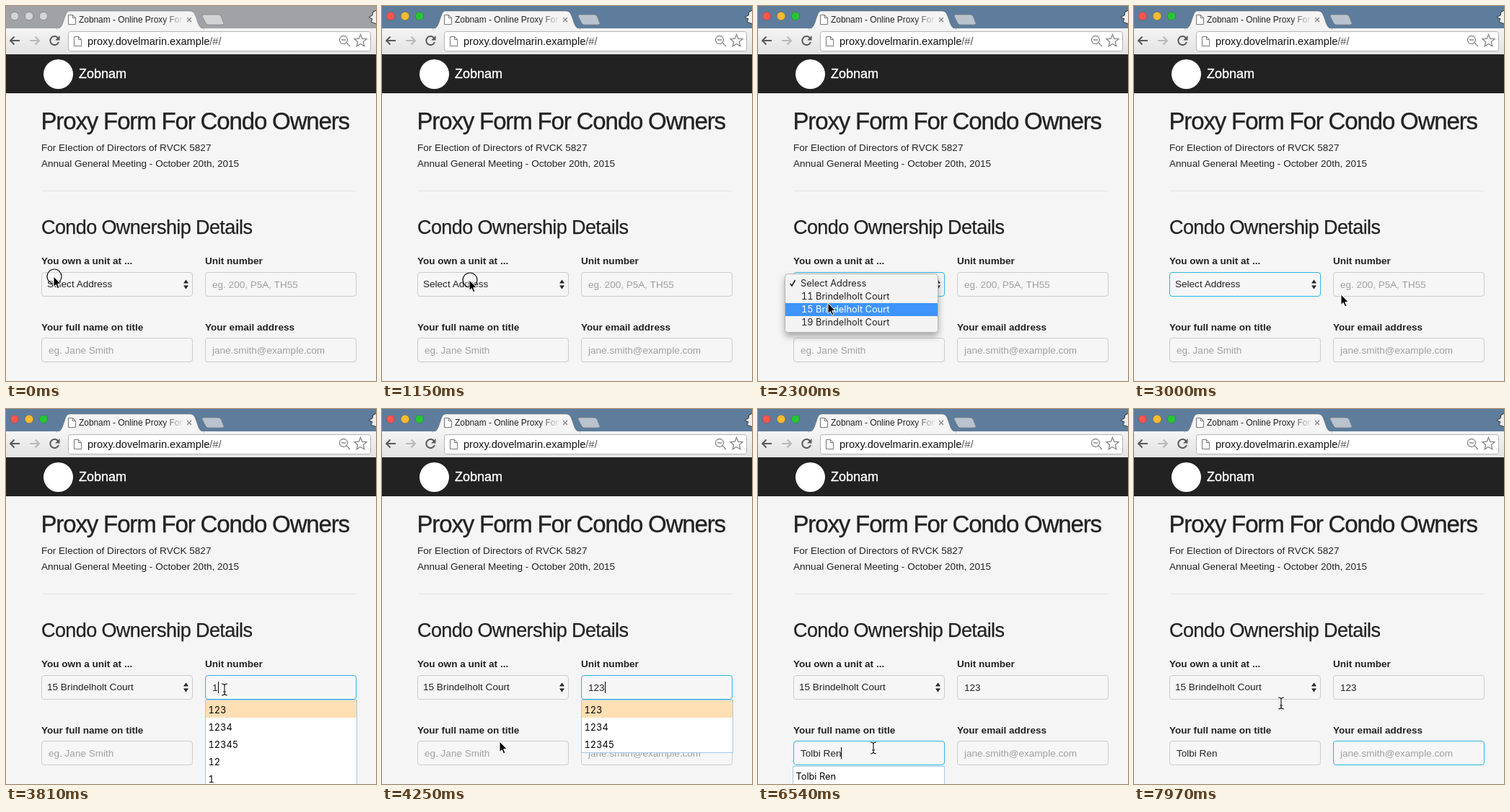
Recreate the animation shown at these times as an HTML page. Size 513 px wide and 520 px high, loop 8000 ms.

```html
<!DOCTYPE html>
<html lang="en">
<head>
<meta charset="utf-8">
<title>Proxy form</title>
<style>
html, body { margin: 0; width: 100%; height: 100%; overflow: hidden; background: #f5f5f5; }
svg { display: block; }
text { font: 13.55px "Liberation Sans", Arial, sans-serif; fill: #222; white-space: pre; }
.label { font-weight: bold; }
.h1 { font-size: 33px; letter-spacing: -1.15px; stroke: #222; stroke-width: .35px; }
.h2 { font-size: 27px; letter-spacing: -.6px; stroke: #222; stroke-width: .25px; }
.brand { font-size: 18px; fill: #fff; stroke: #fff; stroke-width: .4px; }
.tab { font-size: 11.9px; }
.url { font-size: 14.6px; fill: #111; }
.ui { font: 12.8px Inter, Roboto, sans-serif; font-variant-numeric: tabular-nums; fill: #222; }
.hint { fill: #a0a0a0; }
.icon { fill: none; stroke: #5a5a5a; stroke-width: 2; }
.thin { stroke: #888; stroke-width: 1.3; }
.off { stroke: #b8b8b8; }
</style>
</head>
<body>
<svg id="stage" width="513" height="520" viewBox="0 0 513 520">
  <defs>
    <linearGradient id="bar" x2="0" y2="1"><stop stop-color="#f4f4f4"/><stop offset="1" stop-color="#e3e3e3"/></linearGradient>
    <linearGradient id="fade"><stop offset=".8" stop-color="#f4f4f4" stop-opacity="0"/><stop offset="1" stop-color="#f4f4f4"/></linearGradient>
    <filter id="shadow" x="-20%" y="-30%" width="140%" height="180%"><feDropShadow dx="0" dy="5" stdDeviation="5" flood-opacity=".32"/></filter>
  </defs>
  <rect width="513" height="520" fill="#f5f5f5"/>

  <rect id="strip" width="513" height="32"/>
  <g id="lights"><circle cx="12" cy="14" r="5.7"/><circle cx="32" cy="14" r="5.7"/><circle cx="52" cy="14" r="5.7"/></g>
  <path id="plus" d="M274 12H294Q297 12 298 14L302 24Q302 26 299 26H281Q278 26 277 24L272 14Q272 12 274 12Z" stroke="#777" stroke-opacity=".6"/>
  <path d="M514 6L509 8L508 13L503 15.500L508 18L506 22L514 25Z" fill="#eee" stroke="#333"/>
  <rect y="31" width="513" height="36" fill="url(#bar)"/>
  <path d="M70 32C77 31 78 26 81 17C84 9 84 7 90 7H254C260 7 261 9 264 17C267 26 268 31 275 32Z" fill="#f4f4f4" stroke="#555" stroke-opacity=".4"/>
  <path d="M71 32H274" stroke="#f4f4f4" stroke-width="2"/>
  <g fill="#fff" stroke="#777">
    <path d="M86.500 12.500H92.500L96.500 16.500V25.500H86.500ZM92.500 12.500V16.500H96.500"/>
    <rect x="86.500" y="35.500" width="419" height="27" rx="3" stroke="#b5b5b5"/>
    <path d="M94.500 42.500H100.500L104.500 46.500V55.500H94.500ZM100.500 42.500V46.500H104.500"/>
  </g>
  <text class="tab" x="101" y="23">Zobnam - Online Proxy For</text>
  <rect x="101" y="9" width="146" height="19" fill="url(#fade)"/>
  <path class="icon thin" d="M251 16L257 22M257 16L251 22"/>
  <path class="icon" d="M19 48H6M11.500 42.500L6 48L11.500 53.500"/>
  <path class="icon off" d="M33 48H46M40.500 42.500L46 48L40.500 53.500"/>
  <path class="icon" d="M72.500 45A6 6 0 1 0 73 50"/>
  <path d="M74.500 41V47.500H68Z" fill="#5a5a5a"/>
  <g class="icon thin"><circle cx="468" cy="47" r="5.500"/><path d="M465 47H471M472 51L477 56"/><path id="star"/></g>
  <text class="url" x="113" y="54">proxy.dovelmarin.example<tspan fill="#555">/#/</tspan></text>

  <rect y="67" width="513" height="54" fill="#222"/>
  <circle cx="72.500" cy="94.500" r="20.500" fill="#fff"/>
  <text class="brand" x="101" y="100">Zobnam</text>

  <text class="h1" x="48.500" y="171">Proxy Form For Condo Owners</text>
  <text x="49" y="201">For Election of Directors of RVCK 5827</text>
  <text x="49" y="223">Annual General Meeting - October 20th, 2015</text>
  <path d="M49 256.500H486" stroke="#e4e4e4"/>
  <text class="h2" x="49" y="316">Condo Ownership Details</text>
  <g id="form"></g>
  <path d="M246 384.500L249.500 379.500L253 384.500ZM246 387.500L249.500 392.500L253 387.500Z" fill="#222"/>
  <path id="caret" stroke="#000" d="M.5 0V16"/>
  <g id="lists"></g>

  <g id="menu">
    <rect x="37.500" y="371.500" width="212" height="81" rx="4" fill="#f3f3f3" stroke="#b4b4b4" filter="url(#shadow)"/>
    <rect id="highlight" x="38" width="211" height="18" fill="#3f94fb"/>
    <path id="check" d="M44.500 385L47 388L51.500 380" fill="none" stroke-width="1.600"/>
  </g>

  <g id="mouse">
    <circle id="ring" cx="1" r="10" fill="#fff" fill-opacity=".3" stroke="#111" stroke-width="1.200"/>
    <path id="arrow" d="M0 0V14.500L3.300 11.500L5.500 16.800L7.900 15.800L5.700 10.600H10.300Z" fill="#000" stroke="#fff"/>
    <g id="beam" fill="none"><path stroke="#fff" stroke-opacity=".6" stroke-width="2.600"/><path stroke="#111" stroke-width="1.100"/></g>
  </g>
</svg>
<script>
const LOOP = 8000, TICK = 88.4;
const $ = id => document.getElementById(id);
const show = (el, on) => el.setAttribute('visibility', on ? 'visible' : 'hidden');

function add(parent, tag, attrs, text = '') {
  const el = document.createElementNS($('stage').namespaceURI, tag);
  for (const key in attrs) el.setAttribute(key, attrs[key]);
  el.textContent = text;
  return parent.appendChild(el);
}

// Value of the last step that has begun
const at = (steps, t) => steps.findLast(step => step[0] <= t)[1];

function along(points, t) {
  const i = points.findIndex(p => p[0] > t);
  if (i < 0) return points.at(-1).slice(1);
  const [a, b] = [points[i - 1], points[i]], k = (t - a[0]) / (b[0] - a[0]);
  return [1, 2].map(n => a[n] + (b[n] - a[n]) * k);
}

const typing = (word, times) => [[0, ''], ...times.map((t, i) => [t, word.slice(0, i + 1)])];

const street = 'Brindelholt Court', person = 'Tolbi Ren';
const options = ['Select Address', ...[11, 15, 19].map(n => `${n} ${street}`)];
const unitHistory = ['123', '1234', '12345', '12', '1'];

const track = {
  active: [[0, false], [1060, true]],
  focus: [[0, ''], [1410, 'address'], [3350, 'unit'], [4600, 'name'], [7065, 'email']],
  caret: [[0, false], [3350, true], [5035, false], [5305, true], [7605, false]],
  menu: [[0, false], [1495, true], [2910, false]],
  row: [[0, 0], [2115, 1], [2205, 2], [2820, -1]],
  ring: [[0, true], [1495, false], [2565, true], [2645, false], [3170, true], [3260, false], [4425, true], [4600, false]],
  beam: [[0, false], [3080, true], [4065, false], [4335, true]],
  unitList: [[0, false], [3805, true], [4600, false]],
  nameList: [[0, false], [5305, true], [6975, false]],
};
const path = [
  [0, 66, 375], [440, 88, 408], [620, 98, 411], [880, 116, 382], [970, 121, 380],
  [1940, 121, 381], [2290, 97, 412], [2830, 97, 412], [3005, 287, 400], [3180, 303, 389],
  [3980, 303, 389], [4243, 163, 461], [4420, 157, 470], [4600, 157, 470], [4770, 160, 470],
  [7867, 160, 470], [7950, 204, 408],
];

const fields = {
  address: { x: 49, y: 369, pad: 8, label: 'You own a unit at ...', steps: [[0, options[0]], [3080, options[2]]] },
  unit: { x: 276, y: 369, pad: 10, label: 'Unit number', hint: 'eg. 200, P5A, TH55', steps: typing('123', [3805, 3980, 4160]) },
  name: { x: 49, y: 460, pad: 10, label: 'Your full name on title', hint: 'eg. Jane Smith',
    steps: typing(person, [5305, 5565, 5655, 5745, 5835, 6005, 6095, 6355, 6535]) },
  email: { x: 276, y: 460, pad: 10, label: 'Your email address', hint: 'jane.smith@example.com', steps: [[0, '']] },
};
for (const f of Object.values(fields)) {
  const base = f.y + (f.hint ? 22 : 21);
  add($('form'), 'text', { class: 'label', x: f.x, y: f.y === 369 ? 358 : 450 }, f.label);
  f.box = add($('form'), 'rect', { x: f.x + .5, y: f.y + .5, width: 209, height: 33, rx: 3.5, fill: '#f6f6f6' });
  f.text = add($('form'), 'text', { x: f.x + f.pad, y: base });
}

function suggestions(x, y, rows, pick) {
  const group = add($('lists'), 'g', {});
  const frame = add(group, 'rect', { x: x + .5, y: y + .5, width: 210, fill: '#fff', stroke: '#a3c8ea' });
  if (pick) add(group, 'rect', { x: x + 1, y: y + 1, width: 209, height: 24, fill: '#ffdfb4' });
  const items = rows.map((row, i) => add(group, 'text', { class: 'ui', x: x + 4.5, y: y + 19 + 24 * i, style: 'fill:#000' }, row));
  return (on, prefix) => {
    show(group, on);
    const count = rows.filter(row => row.startsWith(prefix)).length;
    frame.setAttribute('height', 24 * count + 1);
    items.forEach((item, i) => show(item, on && i < count));
  };
}
const showUnits = suggestions(276, 403, unitHistory, true);
const showNames = suggestions(48, 495, [person], false);

const menuRows = options.map((option, i) =>
  add($('menu'), 'text', { class: 'ui', x: i ? 60 : 59, y: 389 + 18 * i }, option));

const starPoints = Array.from({ length: 10 }, (_, i) => {
  const r = i % 2 ? 4 : 9, a = i * Math.PI / 5;
  return `${491.5 + r * Math.sin(a)} ${48.5 - r * Math.cos(a)}`;
});
$('star').setAttribute('d', `M${starPoints.join('L')}Z`);
for (const p of $('beam').children)
  p.setAttribute('d', 'M-4 -8Q0 -8 0 -5V5Q0 8 -4 8M4 -8Q0 -8 0 -5M0 5Q0 8 4 8M-2 3H2');

function drawWindow(active) {
  $('strip').setAttribute('fill', active ? '#5e7d9d' : '#a0a2a5');
  $('plus').setAttribute('fill', active ? '#b9c3cd' : '#d2d3d4');
  const colors = active ? ['#fc5650', '#fdbc2e', '#28c435'] : Array(3).fill('#d3d4d6');
  [...$('lights').children].forEach((light, i) => {
    light.setAttribute('fill', colors[i]);
    light.setAttribute('stroke', active ? 'rgba(0,0,0,.15)' : '#8d8f92');
  });
}

function drawForm(t, focus) {
  for (const [id, f] of Object.entries(fields)) {
    const value = at(f.steps, t), on = id === focus;
    f.text.textContent = value || f.hint;
    f.text.setAttribute('class', value ? '' : 'hint');
    f.box.setAttribute('stroke', on ? '#2bb5e3' : '#ccc');
    if (on) {
      const x = f.x + f.pad + (value ? f.text.getComputedTextLength() : 0);
      $('caret').setAttribute('transform', `translate(${Math.round(x)} ${f.y + 9})`);
    }
  }
  show($('caret'), at(track.caret, t));
  showUnits(at(track.unitList, t), at(fields.unit.steps, t));
  showNames(at(track.nameList, t), '');
}

function drawMenu(open, row) {
  $('menu').style.display = open ? '' : 'none';
  show($('highlight'), row >= 0);
  $('highlight').setAttribute('y', 376 + 18 * row);
  $('check').setAttribute('stroke', row === 0 ? '#fff' : '#222');
  menuRows.forEach((el, i) => el.style.fill = i === row ? '#fff' : '');
}

function draw(now) {
  const t = now % LOOP;
  drawWindow(at(track.active, t));
  drawForm(t, at(track.focus, t));
  drawMenu(at(track.menu, t), at(track.row, t));
  const [x, y] = along(path, Math.floor((t + 10) / TICK) * TICK);
  const beam = at(track.beam, t);
  $('mouse').setAttribute('transform', `translate(${Math.round(x)} ${Math.round(y)})`);
  show($('ring'), at(track.ring, t));
  show($('arrow'), !beam);
  show($('beam'), beam);
}

const start = performance.now();
function tick() {
  draw(performance.now() - start);
  requestAnimationFrame(tick);
}
tick();
</script>
</body>
</html>
```
